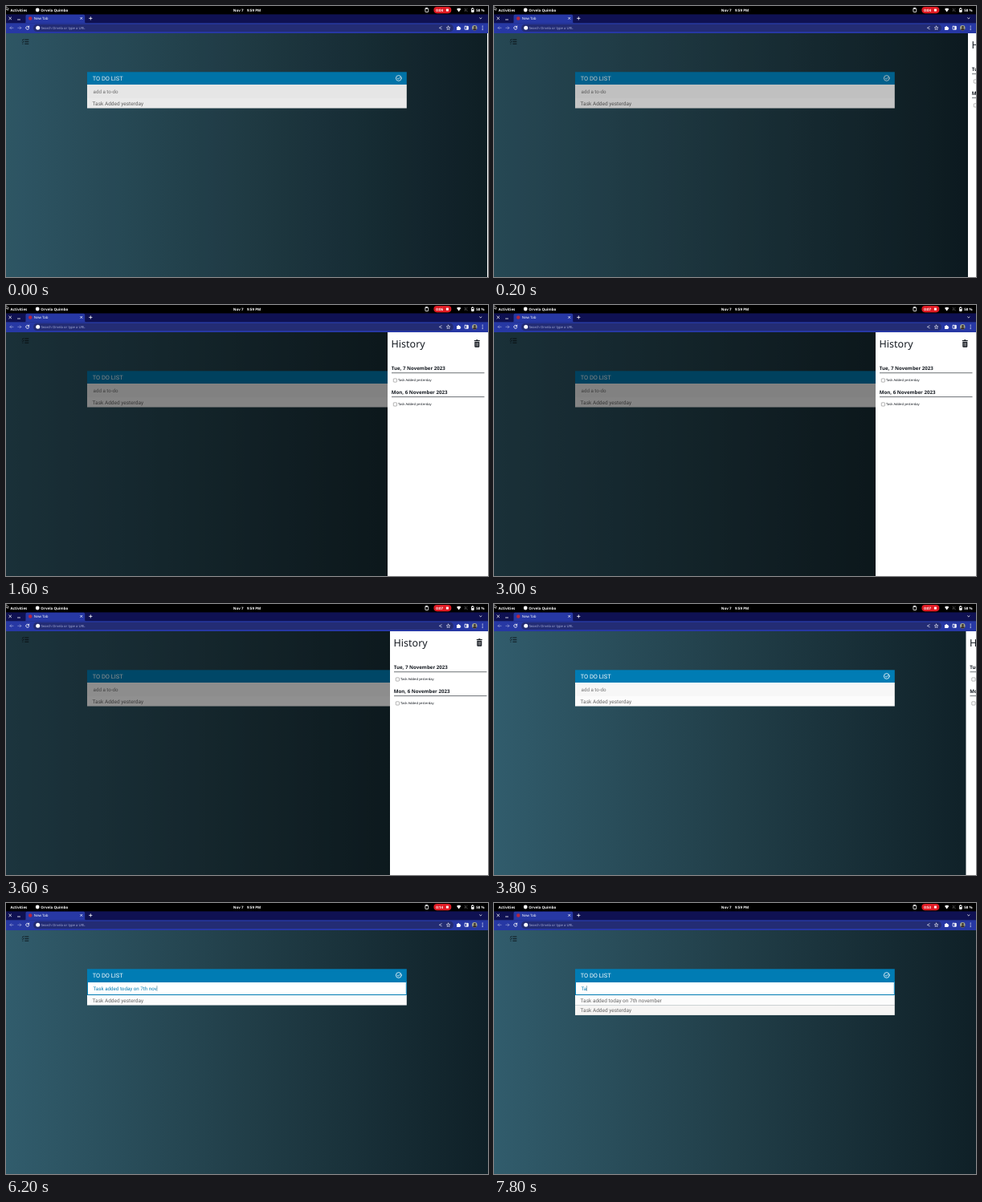
Write an HTML page that moves like this. It is 600 by 338 pixels and loops after 8 s.

```html
<!DOCTYPE html>
<html lang="en">
<head>
<meta charset="utf-8">
<title>To do list</title>
<style>
  html, body { margin: 0; width: 100%; height: 100%; overflow: hidden; background: #000; }
  svg { display: block; width: 100%; height: 100%; }
  text { white-space: pre; text-rendering: geometricPrecision; }
  .ui { font-family: "Noto Sans", sans-serif; fill: #fff; }
  .bar { font-size: 4.5px; font-weight: 600; }
  .card { font-family: Roboto, sans-serif; font-size: 6.5px; fill: #666; }
  .drawer { font-family: "Noto Sans", sans-serif; fill: #161b22; }
  .day { font-size: 6.15px; font-weight: 600; }
  .item { font-size: 4.1px; }
  .line { fill: none; stroke: #fff; stroke-width: .8; stroke-linecap: round; stroke-linejoin: round; }
</style>
</head>
<body>
<svg viewBox="0 0 600 338" preserveAspectRatio="none">
  <defs>
    <linearGradient id="sea">
      <stop offset="0" stop-color="#315c6c"/>
      <stop offset=".5" stop-color="#213e48"/>
      <stop offset="1" stop-color="#0f2027"/>
    </linearGradient>
    <clipPath id="avatarClip"><circle cx="583.3" cy="27.3" r="3.2"/></clipPath>
    <g id="entry">
      <path d="M5 0H120.5" stroke="#30363c" stroke-width=".7"/>
      <rect x="7.3" y="7.2" width="4.2" height="4.2" rx=".6" fill="#fff" stroke="#777" stroke-width=".55"/>
      <text class="item" x="13" y="10.5">Task Added yesterday</text>
    </g>
  </defs>

  <!-- page -->
  <rect y="34" width="600" height="304" fill="url(#sea)"/>
  <path d="M23.3 42H28.3M23.3 44.6H28.3M23.3 47.2H28.3M20 42l.8.8 1.4-1.6M20 44.6l.8.8 1.4-1.6M20.4 47.2h1"
        fill="none" stroke="#0c1418" stroke-width=".9"/>
  <g class="card">
    <rect x="101" y="82.3" width="397.8" height="15.7" fill="#007cb4"/>
    <text x="107.7" y="92.8" style="font-size:7.45px;fill:#fff">TO DO LIST</text>
    <circle class="line" cx="488.8" cy="90" r="3.4"/>
    <path class="line" d="M487.2 90.1l1.2 1.2 2.2-2.5"/>
    <rect x="101" y="98" width="397.8" height="17" fill="#f7f7f7"/>
    <rect id="focus" x="101.5" y="98.5" width="396.8" height="16" fill="#fff" stroke="#007cb4"/>
    <text id="typed" x="108.5" y="108.6" style="font-size:6.22px"></text>
    <rect id="caret" y="103.2" width=".5" height="6.6" fill="#1a5a78"/>
    <rect x="101" y="115" width="397.8" height="12.5" fill="#fcfcfc"/>
    <text id="first" x="107.6" y="123.6"></text>
    <g id="second">
      <rect x="101" y="127.4" width="397.8" height="12.5" fill="#f6f5f4"/>
      <text x="107.6" y="136.1">Task Added yesterday</text>
    </g>
  </g>
  <rect id="shade" y="34" width="600" height="304"/>

  <!-- history drawer -->
  <g id="drawer" class="drawer">
    <rect y="34" width="126" height="304" fill="#fff"/>
    <text x="4.6" y="53.3" style="font-size:12.5px">History</text>
    <path d="M107.8 44.9h7v-1h-2l-.6-.7h-1.8l-.6.7h-2zM108.3 45.7h6v6.1q0 1-1 1h-4q-1 0-1-1z"/>
    <path d="M110 47v4.4M111.3 47v4.4M112.6 47v4.4" stroke="#fff" stroke-width=".45"/>
    <text class="day" x="4.7" y="81">Tue, 7 November 2023</text>
    <use href="#entry" y="84.7"/>
    <text class="day" x="4.7" y="111">Mon, 6 November 2023</text>
    <use href="#entry" y="114.6"/>
  </g>

  <!-- desktop bar -->
  <g class="ui bar">
    <rect width="600" height="10.4" fill="#000"/>
    <text x="5.4" y="6.7">Activities</text>
    <circle cx="39.2" cy="5" r="2.4"/>
    <text x="43.3" y="6.7">Orvela Quimbo</text>
    <text x="282.8" y="6.7">Nov 7</text>
    <text x="300" y="6.7">9:59 PM</text>
    <rect class="line" x="521.9" y="2.9" width="3.8" height="4.6" rx=".5"/>
    <path d="M522.8 2.2h2v1.5h-2z"/>
    <rect x="532.4" y="1" width="22" height="8.2" rx="4.1" fill="#e01b24"/>
    <text id="timer" x="535.2" y="6.7"></text>
    <path d="M547.9 3.6h3v3h-3z"/>
    <path d="M561 3.8q2.7-2.2 5.4 0L563.7 7.5z"/>
    <path d="M571 3l3.4 4.2M571.4 6.8v-2M573.8 4.2v-1" stroke="#777" stroke-width=".7"/>
    <rect class="line" x="579.5" y="3.4" width="2.8" height="4.2" rx=".4"/>
    <path d="M579.6 5h2.6v2.5h-2.6zM580.2 2.3h1.4v1h-1.4z"/>
    <text x="585.2" y="6.7">58 %</text>
  </g>
  <path id="pointer" d="M.2 .5V4.8L1.2 4l.8 1.6.7-.4L2 3.8h1.4z" fill="#000" stroke="#fff" stroke-width=".5"/>

  <!-- browser window -->
  <g class="ui">
    <rect y="10.4" width="600" height="11" fill="#0f1152"/>
    <path d="M23 21.4q1.5 0 1.5-1.5V12.4q0-1.6 1.6-1.6H96.6q1.6 0 1.6 1.6v7.5q0 1.5 1.5 1.5z" fill="#2738a4"/>
    <path class="line" d="M3.8 14l2.8 2.8M6.6 14l-2.8 2.8M14.5 17h3M92.7 14.4l2 2M94.7 14.4l-2 2M103.6 15.4h3.4M105.3 13.7v3.4M589.6 14.8l1.2 1.1 1.2-1.1"/>
    <circle cx="30.2" cy="15.5" r="2.2" fill="#b6263f"/>
    <text x="34.8" y="17.1" style="font-size:4.4px">New Tab</text>
    <rect y="21.2" width="600" height="12.8" fill="#2738a4"/>
    <rect x="34" y="22.8" width="523" height="9.2" rx="4.6" fill="#232c74"/>
    <path class="line" d="M9 27.3H5m1.6-1.6L5 27.3l1.6 1.6M14.8 27.3h4m-1.6-1.6l1.6 1.6-1.6 1.6" stroke-opacity=".45"/>
    <path class="line" d="M28.2 25.9a2 2 0 1 0 .5 1.8M28.7 25v1.4h-1.5"/>
    <circle cx="39.7" cy="27.3" r="2.5"/>
    <text x="43.7" y="28.8" style="font-size:4.2px;fill:#a4abd6">Search Orvela or type a URL</text>
    <path class="line" d="M542.3 25.8l-3 1.5 3 1.5" style="stroke-width:.6"/>
    <path class="line" d="M550.6 25.1l.7 1.5 1.6.2-1.2 1.1.3 1.6-1.4-.8-1.4.8.3-1.6-1.2-1.1 1.6-.2z" style="stroke-width:.6"/>
    <path d="M561 26h1.3a.9.9 0 1 1 1.8 0h1.3v1.2a.9.9 0 1 1 0 1.8v1H561z"/>
    <rect class="line" x="571.1" y="25.3" width="4.2" height="4" rx=".3"/>
    <path d="M573.2 25.2h2.2v4.2h-2.2z"/>
    <g clip-path="url(#avatarClip)">
      <path d="M580 24h7v7h-7z" fill="#a3a78d"/>
      <circle cx="583.5" cy="26.4" r="1.4" fill="#3b302c"/>
      <ellipse cx="583.5" cy="30.2" rx="2.5" ry="2.4" fill="#3b302c"/>
    </g>
    <circle cx="593.2" cy="25.2" r=".6"/><circle cx="593.2" cy="27.3" r=".6"/><circle cx="593.2" cy="29.4" r=".6"/>
  </g>
</svg>
<script>
  const LOOP = 8000, STEP = 200;
  const OLD_TASK = "Task Added yesterday", NEW_TASK = "Task added today on 7th november";
  const FOCUS_AT = 5000, ENTER_AT = 7000, POINTER_END = 4600;

  // Each track is a list of [time, value] points.
  const drawerX = [[0, 599], [200, 590], [400, 561], [600, 508], [800, 482], [1000, 475],
    [3400, 475], [3600, 478], [3800, 587.5], [4000, 600]];
  const shadeAlpha = [[0, .07], [400, .38], [600, .45], [1000, .48], [3400, .48], [3600, .43], [3800, 0]];
  const firstLength = [[5200, 0], [5600, 4], [6200, 27], [6800, 32]];
  const secondLength = [[7400, 0], [7800, 2]];
  const seconds = [[0, 4], [800, 5], [1400, 6], [2600, 7], [4200, 8], [4600, 9], [5000, 10],
    [5200, 11], [5600, 12], [5800, 13], [6200, 14], [6600, 15], [7000, 16], [7400, 53]];

  const byId = id => document.getElementById(id);
  const show = (id, on) => byId(id).setAttribute("visibility", on ? "visible" : "hidden");

  function valueAt(track, t) {
    const next = track.findIndex(([time]) => time > t);
    if (next === 0) return track[0][1];
    if (next < 0) return track[track.length - 1][1];
    const [t0, v0] = track[next - 1], [t1, v1] = track[next];
    return v0 + (v1 - v0) * (t - t0) / (t1 - t0);
  }

  const heldAt = (track, t) => track.filter(([time]) => time <= t).pop()[1];

  function draw(t) {
    const entered = t >= ENTER_AT, focused = t >= FOCUS_AT;
    byId("drawer").setAttribute("transform", `translate(${valueAt(drawerX, t)} 0)`);
    byId("shade").setAttribute("opacity", valueAt(shadeAlpha, t));
    byId("timer").textContent = "0:" + String(heldAt(seconds, t)).padStart(2, "0");

    const length = Math.round(valueAt(entered ? secondLength : firstLength, t));
    const input = NEW_TASK.slice(0, length), typed = byId("typed");
    typed.textContent = input || "add a to-do";
    typed.style.fill = input ? "#007cb4" : "#777";
    byId("caret").setAttribute("x", 108.5 + (input ? typed.getComputedTextLength() : 0));
    byId("first").textContent = entered ? NEW_TASK : OLD_TASK;
    show("focus", focused);
    show("caret", focused);
    show("second", entered);
    show("pointer", t < POINTER_END);
  }

  const start = performance.now();
  function tick() {
    const t = (performance.now() - start) % LOOP;
    draw(Math.floor(t / STEP) * STEP);
    requestAnimationFrame(tick);
  }
  tick();
</script>
</body>
</html>
```
